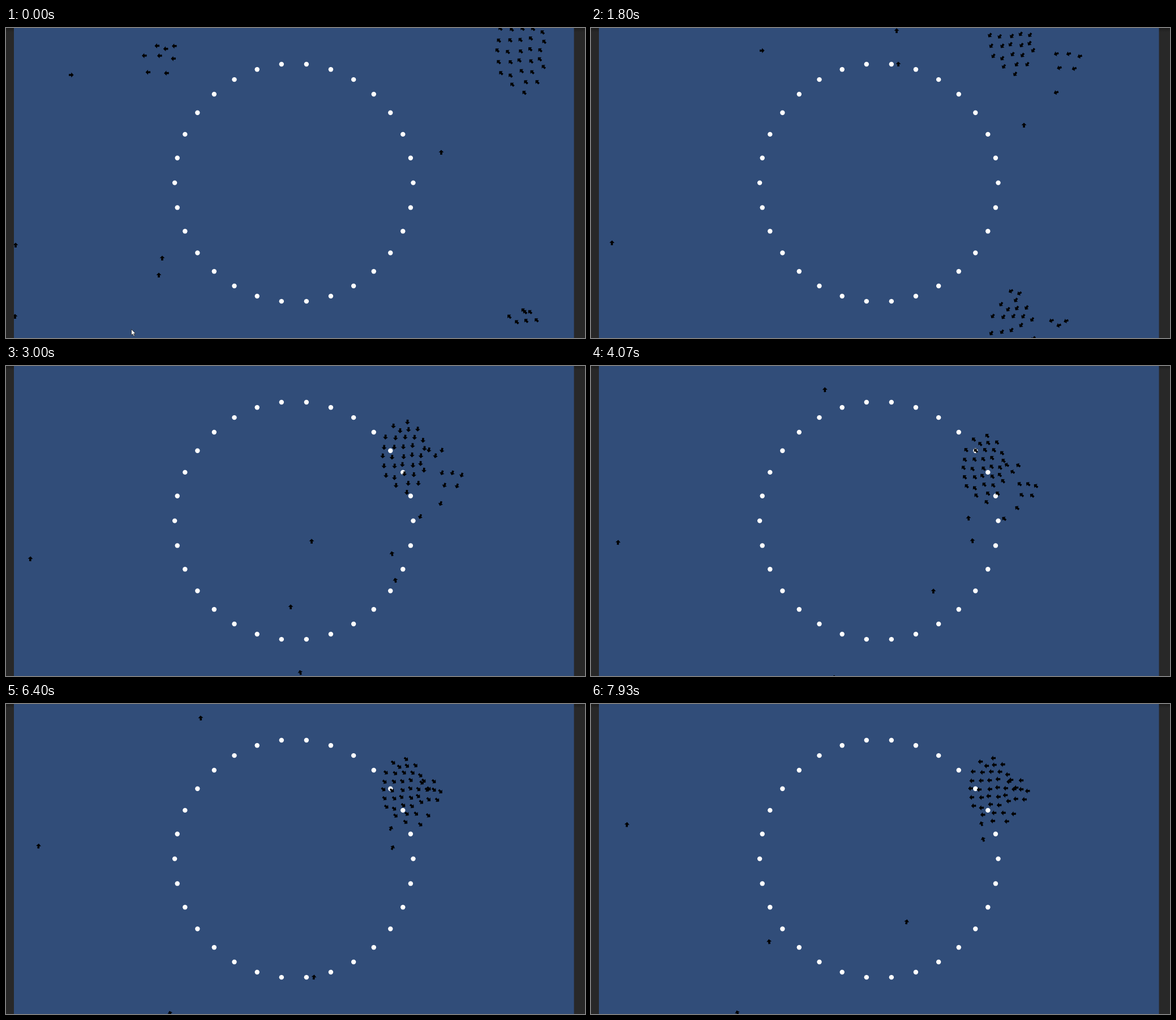
These frames come from a looping animation (1023 by 548 pixels, 8000 ms). An HTML page with a canvas:

```html
<!DOCTYPE html>
<html lang="en">
<head>
<meta charset="utf-8">
<title>Flock</title>
<style>
html, body { margin: 0; width: 100%; height: 100%; overflow: hidden; background: #282828; }
canvas { display: block; width: 1023px; height: 548px; }
</style>
</head>
<body>
<canvas id="stage" width="1023" height="548"></canvas>
<script>
const W = 1023, H = 548, LOOP = 8000, STEP = 1000 / 15;
const LEFT = 14, RIGHT = 1003.5;
const ctx = document.getElementById('stage').getContext('2d');

let seed = 11;
const random = () => (seed = seed * 16807 % 2147483647) / 2147483647;
const mix = (a, b, u) => a + (b - a) * u;
const wrap = (v, lo, size) => ((v - lo) % size + size) % size + lo;

function segment(keys, t) {
  let i = 0;
  while (i < keys.length - 2 && t >= keys[i + 1][0]) i++;
  return i;
}

// Smooth curve through [seconds, ...values] keys
function spline(keys, axis, t) {
  const last = keys.length - 1, i = segment(keys, t);
  const slope = k => {
    const a = keys[Math.max(0, k - 1)], b = keys[Math.min(last, k + 1)];
    return (b[axis] - a[axis]) / (b[0] - a[0]);
  };
  const p = keys[i], q = keys[i + 1], d = q[0] - p[0];
  const u = Math.min(1, (t - p[0]) / d), w = 1 - u;
  return p[axis] * (1 + 2 * u) * w * w + slope(i) * d * u * w * w
    + q[axis] * u * u * (3 - 2 * u) - slope(i + 1) * d * u * u * w;
}

function ramp(keys, t) {
  const i = segment(keys, t), [t0, a] = keys[i], [t1, b] = keys[i + 1];
  return mix(a, b, Math.min(1, (t - t0) / (t1 - t0)));
}

// Evenly spread random points in an ellipse, as fractions of its radii
function scatter(n, aspect) {
  const points = [];
  while (points.length < n) {
    let best, far = -1;
    for (let k = 0; k < 300; k++) {
      const r = Math.sqrt(random()), a = random() * 2 * Math.PI;
      const p = [r * Math.cos(a), r * Math.sin(a)];
      const gap = Math.min(9, ...points.map(o => Math.hypot(p[0] - o[0], (p[1] - o[1]) * aspect)));
      if (gap > far) { far = gap; best = p; }
    }
    points.push(best);
  }
  return points;
}

// Birds speed up while they cross the top edge
const hurry = y => y < 0 ? y - Math.min(24, -y * 4) : y;

// Path of the group's centre; radii shrink as the birds gather
const groups = [
  { n: 34, from: [44, 74], to: [36, 57],
    path: [[0, 910, 41], [1.8, 744, 14], [3, 703, 160], [4.07, 694, 181],
      [5.07, 716, 168], [6.4, 701, 152], [7.2, 710, 152], [8, 704, 150]],
    turn: [[0, 225], [1.8, 125], [3, 94], [4.07, 228], [5.07, 256], [6.4, 400], [8, 550]] },
  { n: 3, from: [17, 5], to: [10, 13],
    path: [[0, 1282, 32], [1.8, 828, -14], [3, 760, 149], [4.07, 746, 176],
      [5.07, 767, 155], [6.4, 748, 137], [7.2, 757, 137], [8, 751, 135]],
    turn: [[0, 178], [1.8, 160], [3, 102], [4.07, 212], [5.07, 240], [6.4, 400], [8, 550]] },
  { n: 5, from: [28, 24], to: [13, 14],
    path: [[0, 1267, 60], [1.8, 842, 55], [3, 787, 197], [4.07, 771, 216],
      [5.07, 784, 186], [6.4, 755, 158], [7.2, 763, 158], [8, 758, 157]],
    turn: [[0, 178], [1.8, 162], [3, 110], [4.07, 220], [5.07, 240], [6.4, 400], [8, 550]] }
];

const birds = [];
for (const { n, from, to, path, turn } of groups) {
  for (const [px, py] of scatter(n, from[1] / from[0])) {
    birds.push(t => {
      const u = Math.min(1, t / 5);
      const x = spline(path, 1, t) + px * mix(from[0], to[0], u);
      const y = spline(path, 2, t) + py * mix(from[1], to[1], u);
      // Once gathered, the outer birds circle round the middle
      const sway = t > 5 ? Math.sin((t - 5) * 2.2) * (x - 715) * 0.7 : 0;
      return [x, hurry(y), ramp(turn, t) + sway];
    });
  }
}

// Single birds; y runs on past the edge and wraps when drawn
function lone(path, turn = [[0, 270], [8, 270]]) {
  birds.push(t => [spline(path, 1, t), spline(path, 2, t), ramp(turn, t)]);
}

// Four that keep flying upwards
lone([[0, 16, 510], [1.8, 37, 380], [3, 43, 341], [5.07, 52, 286], [8, 64, 210]],
  [[0, 270], [3, 275], [8, 275]]);
lone([[0, 276, 407], [1.8, 540, 5], [3, 520, -14], [4.07, 430, -5],
  [5.07, 350, -2], [6.4, 290, -9], [8, 256, -10]], [[0, 270], [1.8, 270], [3, 255], [8, 252]]);
lone([[0, 270, 437], [1.8, 543, 64], [3, 503, -130], [4.07, 413, -515],
  [5.07, 351, -869], [6.4, 344, -1087], [8, 312, -1262]], [[0, 270], [4, 268], [8, 262]]);
lone([[0, 115, 83], [1.8, 302, 40], [3, 540, -246], [4.07, 605, -715],
  [5.07, 570, -955], [6.4, 544, -1185], [8, 559, -1291]], [[0, 360], [1.8, 358], [3, 270], [8, 282]]);

// Four that join the flock
const follow = groups[2].turn;
lone([[0, 1015, 384], [1.8, 822, 114], [3, 768, 243], [4.07, 753, 251],
  [5.07, 768, 215], [6.4, 746, 197], [8, 747, 194]], [[0, 270], ...follow.slice(1)]);
lone([[0, 769, 220], [1.8, 765, 172], [3, 732, 266], [4.07, 730, 270],
  [5.07, 752, 231], [6.4, 732, 213], [8, 735, 207]], [[0, 270], [1.8, 270], ...follow.slice(2)]);
const straggle = [[0, 225], [1.8, 150], [3, 258], [5.07, 270], [6.4, 295], [8, 246]];
lone([[0, 914, -57], [1.8, 742, -91], [3, 682, -224], [4.07, 667, -287],
  [5.07, 692, -325], [6.4, 680, -336], [8, 691, -345]], straggle);
lone([[0, 926, -54], [1.8, 757, -87], [3, 688, -177], [4.07, 674, -247],
  [5.07, 698, -286], [6.4, 683, -302], [8, 694, -318]], straggle);

function shape(points) {
  ctx.beginPath();
  for (const [x, y] of points) ctx.lineTo(x, y);
  ctx.closePath();
}

const ARROW = [[4.6, 0], [0.2, -4.5], [0.2, -1.8], [-4, -1.8], [-4, 1.8], [0.2, 1.8], [0.2, 4.5]];
const POINTER = [[0, 0], [0, 10.5], [2.4, 8.3], [4, 12], [5.8, 11.2], [4.2, 7.7], [7.3, 7.5]];

function arrow(x, y, deg) {
  ctx.save();
  ctx.translate(wrap(x, 10, 998), wrap(y, -4, 556));
  ctx.rotate(deg * Math.PI / 180);
  shape(ARROW);
  ctx.fill();
  ctx.restore();
}

function ring() {
  ctx.fillStyle = '#fff';
  for (let i = 0; i < 30; i++) {
    const a = i * Math.PI / 15;
    ctx.beginPath();
    ctx.arc(508.8 + 210.7 * Math.cos(a), 273.6 + 210.7 * Math.sin(a), 4.2, 0, 7);
    ctx.fill();
  }
}

function pointer(t) {
  if (t > 0.25) return;
  ctx.save();
  ctx.translate(221.5, 532.5 + t * 70);
  shape(POINTER);
  ctx.fillStyle = '#fff';
  ctx.strokeStyle = '#222';
  ctx.lineWidth = 0.8;
  ctx.fill();
  ctx.stroke();
  ctx.restore();
}

function draw(t) {
  ctx.fillStyle = '#282828';
  ctx.fillRect(0, 0, W, H);
  const shade = ctx.createLinearGradient(0, 0, 0, 7);
  shade.addColorStop(0, 'rgba(0,0,0,.3)');
  shade.addColorStop(1, 'rgba(0,0,0,0)');
  ctx.fillStyle = shade;
  ctx.fillRect(0, 0, W, 7);
  ctx.fillStyle = '#314d79';
  ctx.fillRect(LEFT, 0, RIGHT - LEFT, H);

  ctx.save();
  ctx.beginPath();
  ctx.rect(LEFT, 0, RIGHT - LEFT, H);
  ctx.clip();
  ring();
  ctx.fillStyle = '#000';
  for (const bird of birds) arrow(...bird(t));
  pointer(t);
  ctx.restore();
}

const start = performance.now();
function tick() {
  const t = (performance.now() - start) % LOOP;
  draw(Math.floor((t + 1) / STEP) * STEP / 1000);
  requestAnimationFrame(tick);
}
tick();
</script>
</body>
</html>
```
